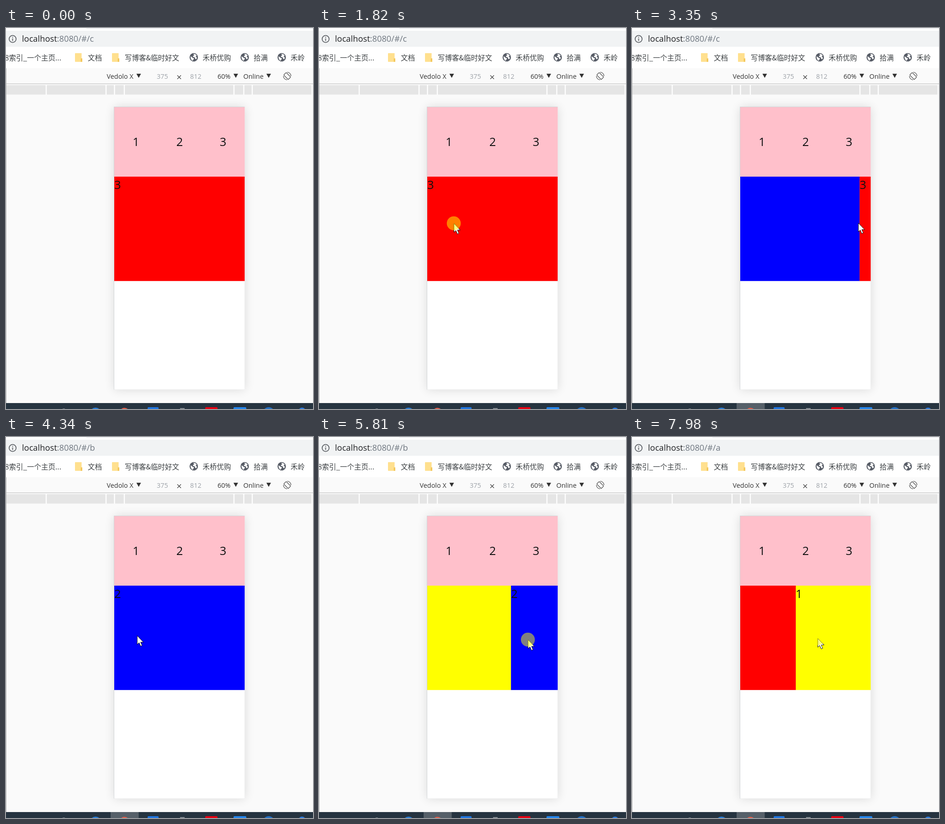
Animation, 672 px wide and 833 px high, one loop 8 s. Source, as an HTML page:

```html
<!DOCTYPE html>
<html lang="zh">
<head>
<meta charset="utf-8">
<title>Slide demo</title>
<style>
  html, body { margin: 0; width: 100%; height: 100%; overflow: hidden; background: #fafafa; }
  svg { display: block; width: 100%; height: 100%; }
  text { font-family: "Open Sans", "Noto Sans", sans-serif; white-space: pre; }
  .url { font-size: 18.3px; fill: #202124; }
  .dim { fill: #6f7780; }
  .mark text { font: 15.5px "Noto Sans CJK SC", "Noto Sans CJK", sans-serif; fill: #3c4043; }
  .tool text { font-size: 14.4px; fill: #333; }
  .tool .size { fill: #9da2a8; }
  .num text { font-size: 25.5px; fill: #111; }
</style>
</head>
<body>
<svg viewBox="0 0 672 833">
  <defs>
    <clipPath id="view"><rect x="237" y="325" width="285.5" height="228.4"/></clipPath>
    <filter id="blur" x="-30%" y="-15%" width="160%" height="130%"><feGaussianBlur stdDeviation="11"/></filter>
    <g id="folder">
      <path d="M1 0H14.5V11.5H16V19H1Q0 19 0 18V1Q0 0 1 0Z" fill="#ffe08f"/>
      <path d="M12.5 11.5H16V19H12.5Z" fill="#f3c75c"/>
    </g>
    <g id="globe">
      <circle r="9.2" fill="#575c66"/>
      <path d="M-7-2Q-4-1-3 1L0 2Q1 4-1 5L-2 7.6Q-7 6-7-2Z" fill="#fff"/>
      <path d="M-1-7.4Q4-8 6.6-3.5L4-2.5 6.5 0.5Q7 2 5.4 4.5L3 3 2 0-2-1-1.5-3 1-4Z" fill="#fff"/>
    </g>
    <path id="down" d="M0 0H10L5 9Z" fill="#333"/>
  </defs>

  <rect width="672" height="833" fill="#fafafa"/>
  <rect width="672" height="88" fill="#fff"/>
  <rect x="176" width="496" height="1" fill="#e1e4e8"/>
  <rect y="6" width="672" height="35" fill="#f1f3f4"/>
  <g fill="none" stroke="#5f6368" stroke-width="1.8">
    <circle cx="14.5" cy="24" r="7.6"/>
    <path d="M14.5 23V28.2M14.5 19.6V21.5"/>
  </g>
  <text class="url" x="35" y="30">localhost<tspan class="dim" id="path">:8080/#/c</tspan></text>

  <g class="mark">
    <text x="121" y="71" text-anchor="end">8索引_一个主页...</text>
    <use href="#folder" x="151" y="55"/><text x="179" y="71">文档</text>
    <use href="#folder" x="232" y="55"/><text x="260" y="71">写博客&amp;临时好文</text>
    <use href="#globe" x="411" y="64"/><text x="430.5" y="71">禾桥优购</text>
    <use href="#globe" x="522.5" y="64"/><text x="542" y="71">拾满</text>
    <use href="#globe" x="603.5" y="64"/><text x="623" y="71">禾岭</text>
  </g>

  <g class="tool">
    <text x="220.5" y="111">Vedolo X</text><use href="#down" x="285.5" y="100"/>
    <text class="size" x="330" y="111">375</text>
    <path d="M375 103.5L383 111.5M383 103.5L375 111.5" stroke="#444" stroke-width="1.3"/>
    <text class="size" x="403" y="111">812</text>
    <text x="463" y="111">60%</text><use href="#down" x="498" y="100"/>
    <text x="519.5" y="111">Online</text><use href="#down" x="570" y="100"/>
    <g transform="translate(615.5 105)" fill="none" stroke="#555" stroke-width="1.3">
      <rect x="-3.8" y="-7" width="7.6" height="14" rx="1" transform="rotate(-45)"/>
      <path d="M0-8.3A8.3 8.3 0 0 1 8.3 0M0 8.3A8.3 8.3 0 0 1-8.3 0"/>
    </g>
  </g>
  <rect y="121.3" width="672" height="1.4" fill="#c9c9c9"/>
  <rect y="125" width="672" height="20.5" fill="#e5e5e5"/>
  <path id="ticks" stroke="#fff" stroke-width="2.4"/>

  <rect x="237" y="173" width="285.5" height="617.5" fill="#000" opacity=".13" filter="url(#blur)"/>
  <rect x="236" y="172" width="286.5" height="618.5" fill="#d3d6d8"/>
  <rect x="237" y="173" width="285.5" height="617.5" fill="#fff"/>
  <rect x="237" y="173" width="285.5" height="152.2" fill="#ffc0cb"/>
  <g class="num" text-anchor="middle">
    <text x="284.5" y="258">1</text><text x="380" y="258">2</text><text x="475" y="258">3</text>
  </g>
  <g class="num" clip-path="url(#view)"><g id="slides"></g></g>
  <rect y="88" width="1" height="732" fill="#b9b9b9"/>

  <rect y="820" width="672" height="13" fill="#263440"/>
  <rect id="hover" x="229" y="820" width="61.5" height="13" fill="#566069"/>
  <g>
    <rect x="124" y="832" width="5" height="1" fill="#7d878f"/>
    <circle cx="196" cy="843" r="13" fill="#2b7fd9"/>
    <circle cx="259.5" cy="842" r="11.5" fill="#e8604c"/>
    <rect x="310" y="829" width="24" height="20" rx="2" fill="#1f75e0"/>
    <rect x="381" y="831" width="10" height="10" fill="#848c93"/>
    <rect x="436" y="829" width="27" height="20" rx="2" fill="#e60012"/>
    <rect x="498" y="829" width="28" height="20" rx="2" fill="#2386ee"/>
    <circle cx="575" cy="842" r="13" fill="#2470c4"/>
    <circle cx="648" cy="838" r="8" fill="#2f7de0"/>
  </g>

  <g id="cursor">
    <path d="M.5 .5V19.6L4.7 15.8 8 23.4 11.2 22 8 14.8H14.2Z" fill="#fff" stroke="#111" stroke-linejoin="round"/>
    <circle id="touch" r="15.3" fill="#ff0" opacity=".5"/>
  </g>
</svg>
<script>
const LOOP = 8000, WIDTH = 285.5, LEFT = 237, SETTLE = 420;
const $ = id => document.getElementById(id);

// Pointer tip: time, x, y
const path = [
  [0, 592, 840], [70, 592, 833], [300, 470, 620], [480, 300, 430], [580, 246, 368],
  [640, 242, 359], [700, 253, 357], [870, 300, 408], [1000, 298, 416], [1260, 295, 426],
  [1430, 295, 427], [2000, 295, 427], [2710, 397, 424], [3180, 495, 426], [3880, 495, 426],
  [4100, 402, 453], [4340, 287, 434], [4420, 268, 430], [4870, 268, 430], [5680, 435, 441],
  [5810, 457, 443], [5890, 480, 445], [6500, 480, 445], [6800, 400, 534], [7130, 280, 437],
  [7250, 276, 432], [7450, 276, 432], [7980, 406, 440], [8080, 430, 441]
];

// Each drag pulls in the previous page; grab is the pointer x at offset zero
const drags = [
  { down: 1820, move: 2000, up: 3230, done: 3700, grab: 304, page: 2 },
  { down: 4600, move: 4870, up: 5890, done: 6320, grab: 274, page: 1 },
  { down: 7450, move: 7450, up: 9000, done: 9500, grab: 285, page: 0 }
];

const colors = ['#ff0', '#00f', '#f00'];
const slides = colors.map((color, i) => {
  const g = document.createElementNS('http://www.w3.org/2000/svg', 'g');
  g.innerHTML = `<rect y="325" width="${WIDTH + .3}" height="228.4" fill="${color}"/>` +
    `<text y="351.5">${i + 1}</text>`;
  return $('slides').appendChild(g);
});
$('ticks').setAttribute('d', [88, 219, 237.5, 259, 499, 520.5, 539, 670].map(x => `M${x} 124V146`).join(''));

// Monotone slope: flat at turning points, harmonic mean elsewhere
function slope(i, axis) {
  const [a, b, c] = [path[i - 1], path[i], path[i + 1]];
  if (!a || !c) return 0;
  const p = (b[axis] - a[axis]) / (b[0] - a[0]);
  const q = (c[axis] - b[axis]) / (c[0] - b[0]);
  return p * q > 0 ? 2 * p * q / (p + q) : 0;
}

function pointer(t, axis) {
  const i = path.findIndex(k => k[0] > t) - 1;
  const a = path[i], b = path[i + 1], h = b[0] - a[0], u = (t - a[0]) / h, v = 1 - u;
  return a[axis] * v * v * (1 + 2 * u) + b[axis] * u * u * (3 - 2 * u) +
    h * u * v * (slope(i, axis) * v - slope(i + 1, axis) * u);
}

function offset(drag, t) {
  if (t < drag.move) return 0;
  const pulled = Math.max(0, pointer(Math.min(t, drag.up), 1) - drag.grab);
  if (t < drag.up) return pulled;
  const u = Math.min(1, (t - drag.up) / SETTLE);
  return WIDTH - (WIDTH - pulled) * (1 - u) ** 4;
}

function place(slide, x) {
  slide.setAttribute('transform', `translate(${x.toFixed(2)} 0)`);
}

function draw(t) {
  const drag = drags.find(d => t < d.done);
  const { page } = drag, prev = (page + 2) % 3, dx = offset(drag, t);
  slides.forEach((s, i) => place(s, LEFT + (i === page ? dx : i === prev ? dx - WIDTH : WIDTH)));
  $('path').textContent = ':8080/#/' + 'abc'[page];
  $('cursor').setAttribute('transform', `translate(${pointer(t, 1).toFixed(1)} ${pointer(t, 2).toFixed(1)})`);
  $('touch').style.display = t >= drag.down && t < drag.up ? '' : 'none';
  $('hover').style.display = t >= 1870 ? '' : 'none';
}

const start = performance.now();
function tick(now) {
  draw(Math.max(0, now - start) % LOOP);
  requestAnimationFrame(tick);
}
draw(0);
requestAnimationFrame(tick);
</script>
</body>
</html>
```
